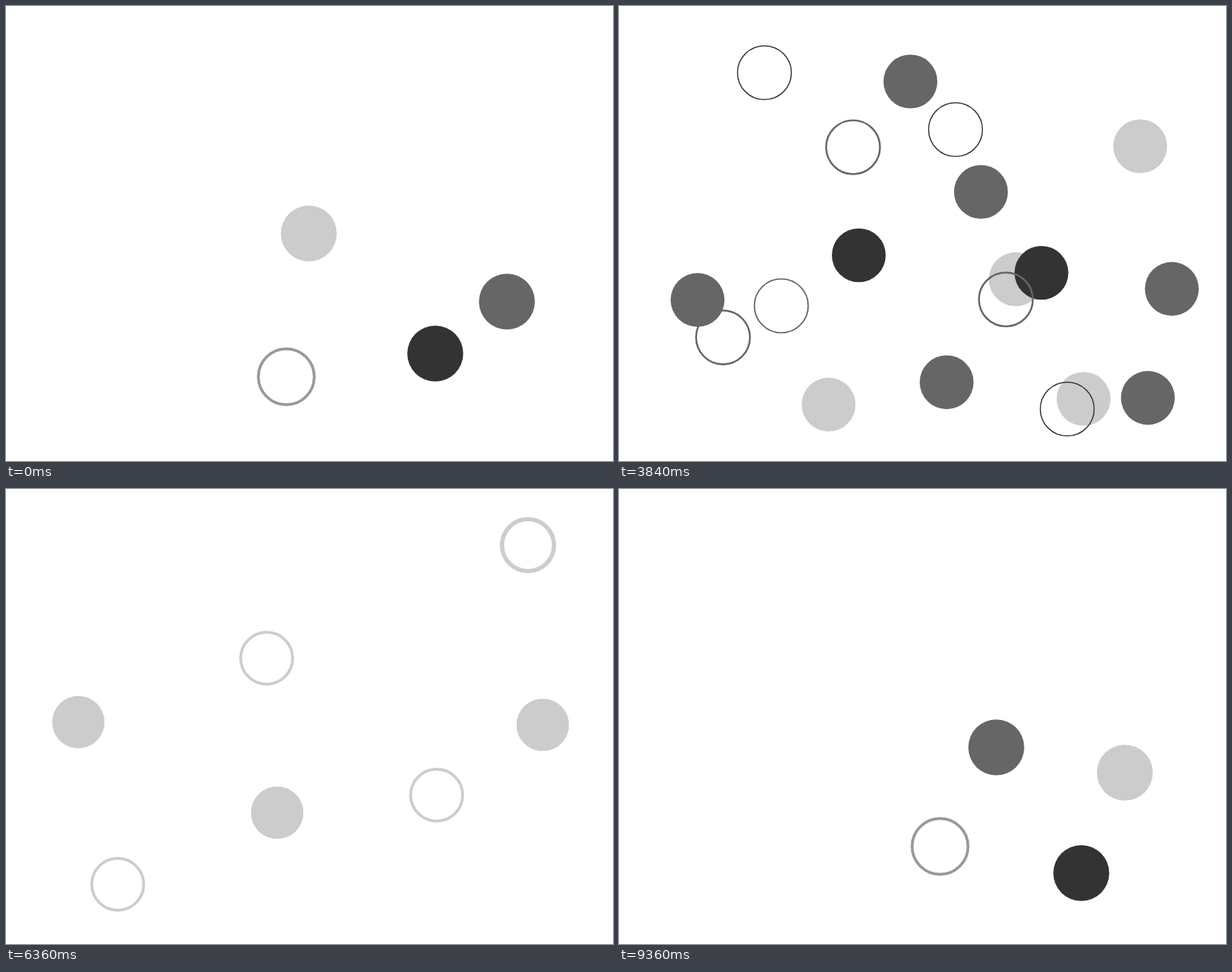
These frames come from a looping animation (864 by 648 pixels, 9400 ms). An HTML page with a canvas:

```html
<!DOCTYPE html>
<html lang="en">
<head>
<meta charset="utf-8">
<title>Circles</title>
<style>
  html, body { margin: 0; height: 100%; overflow: hidden; background: #fff; }
  canvas { display: block; }
</style>
</head>
<body>
<canvas width="864" height="648"></canvas>
<script>
const ctx = document.querySelector("canvas").getContext("2d");
const LOOP = 9400, STEP = 40;
const CENTER = [590, 424];
const HOLD = 800, MERGED = 1600, SPREAD = 3440, MIXED = 4480, FADED = 4600;
const CALM = 6360, PULSE = 7360, EDGE = 8440, END = 9360;

const RADIUS = [[0, 39.8], [MERGED, 39.4], [SPREAD, 39.2], [MIXED, 37], [PULSE, 37], [END, 39.8]];

// Key: [time, x, y, gray level 0-5, stroke width]
const tracks = [];
const solid = (...keys) => tracks.push({ keys, ring: false });
const ring = (...keys) => tracks.push({ keys, ring: true });
const spreadPoint = p => p.map((v, i) => CENTER[i] + (v - CENTER[i]) * 1840 / 1560);

// Four circles meet in the center
const gather = (add, x, y, level, width) => add(
  [0, x, y, level, width], [HOLD, x, y, level, width], [MERGED, ...CENTER, 2, 0]);
gather(solid, 431, 324, 4, 0);
gather(solid, 713, 421, 2, 0);
gather(solid, 611, 495, 1, 0);
gather(ring, 399, 528, 3, 4);

// Final places of the three lasting circles
const calm = [[103, 332], [386, 461], [764, 336]];

// They burst out, wander, and join the lasting ones: [x, y, level, next x, next y, next level, goal]
[
  [751, 105, 4, 681, 443, 4, 1],
  [354, 545, 4, 277, 569, 4, 0],
  [320, 139, 2, 644, 139, 2, 2],
  [194, 354, 2, 94, 542, 1, 0],
  [470, 265, 2, 622, 310, 2, 2],
  [391, 428, 1, 319, 237, 1, 1],
  [470, 489, 2, 495, 592, 2, 1],
  [507, 366, 4, 681, 443, 4, 1],
  [721, 543, 1, 766, 548, 4, 2],
  [595, 545, 4, 766, 548, 4, 2],
  [640, 330, 1, 525, 487, 1, 2],
  [768, 431, 2, 766, 356, 2, 2]
].forEach(([x, y, level, x2, y2, level2, goal]) => solid(
  [MERGED, ...CENTER, 2, 0], [SPREAD, ...spreadPoint([x, y]), level, 0],
  [MIXED, x2, y2, level2, 0], [CALM, ...calm[goal], 4, 0]));

// Outlines that burst out and thin away
[[340, 313, 394, 54], [236, 524, 109, 360], [627, 440, 418, 378]].forEach(([x, y, x2, y2]) => {
  const from = spreadPoint([x, y]), k = (FADED - SPREAD) / (MIXED - SPREAD);
  const to = [x2, y2].map((v, i) => from[i] + (v - from[i]) * k);
  ring([MERGED, ...CENTER, 1, 0], [SPREAD, ...from, 1, 4], [FADED, ...to, 4, 0]);
});

// Outlines that swell into thick rings
[
  [207, 95, 1, 4, 743, 80, 6, 765, 121, 37],
  [479, 176, 1, 4, 371, 241, 4, 256, 318, 42],
  [231, 427, 2, 5, 159, 563, 4, 462, 551, 47],
  [638, 574, 1, 4, 613, 436, 4, 678, 404, 47]
].forEach(([x, y, level, w, x2, y2, w2, x3, y3, w3], i) => {
  const last = i === 2
    ? [[EDGE, 460, 530, 3, 4], [END, 457, 509, 3, 4]]
    : [[EDGE, x3, y3, 4, 0]];
  ring([SPREAD, x, y, level, 0], [MIXED, x, y, level, w], [CALM, x2, y2, 4, w2],
    [PULSE, x3, y3, 4, w3], ...last);
});

// Lasting circles
solid([CALM, ...calm[0], 4, 0], [PULSE, 103, 186, 2, 0], [EDGE, 108, 40, 2, 0], [END, 537, 368, 2, 0]);
solid([CALM, ...calm[1], 4, 0], [PULSE, 435, 357, 2, 0], [EDGE, 788, 300, 4, 0], [END, 720, 404, 4, 0]);
solid([CALM, ...calm[2], 4, 0], [PULSE, 750, 556, 2, 0], [EDGE, 720, 550, 1, 0], [END, 658, 547, 1, 0]);

function sample(keys, time) {
  const next = keys.findIndex(key => key[0] > time);
  if (next === 0) return null;
  if (next < 0) return time === keys.at(-1)[0] ? keys.at(-1) : null;
  const a = keys[next - 1], b = keys[next];
  const k = (time - a[0]) / (b[0] - a[0]);
  return a.map((v, i) => v + (b[i] - v) * k);
}

function draw(time) {
  ctx.fillStyle = "#fff";
  ctx.fillRect(0, 0, 864, 648);
  const radius = sample(RADIUS, time)[1];
  for (const { keys, ring } of tracks) {
    const state = sample(keys, time);
    if (!state) continue;
    const [, x, y, level, width] = state;
    const gray = Math.round(level) * 51;
    const color = `rgb(${gray}, ${gray}, ${gray})`;
    ctx.beginPath();
    ctx.arc(x, y, radius, 0, Math.PI * 2);
    if (!ring) {
      ctx.fillStyle = color;
      ctx.fill();
    } else if (width > 0) {
      ctx.strokeStyle = color;
      ctx.lineWidth = width;
      ctx.stroke();
    }
  }
}

const start = performance.now();
function tick() {
  const time = (performance.now() - start) % LOOP;
  draw(Math.floor(time / STEP) * STEP);
  requestAnimationFrame(tick);
}
tick();
</script>
</body>
</html>
```
